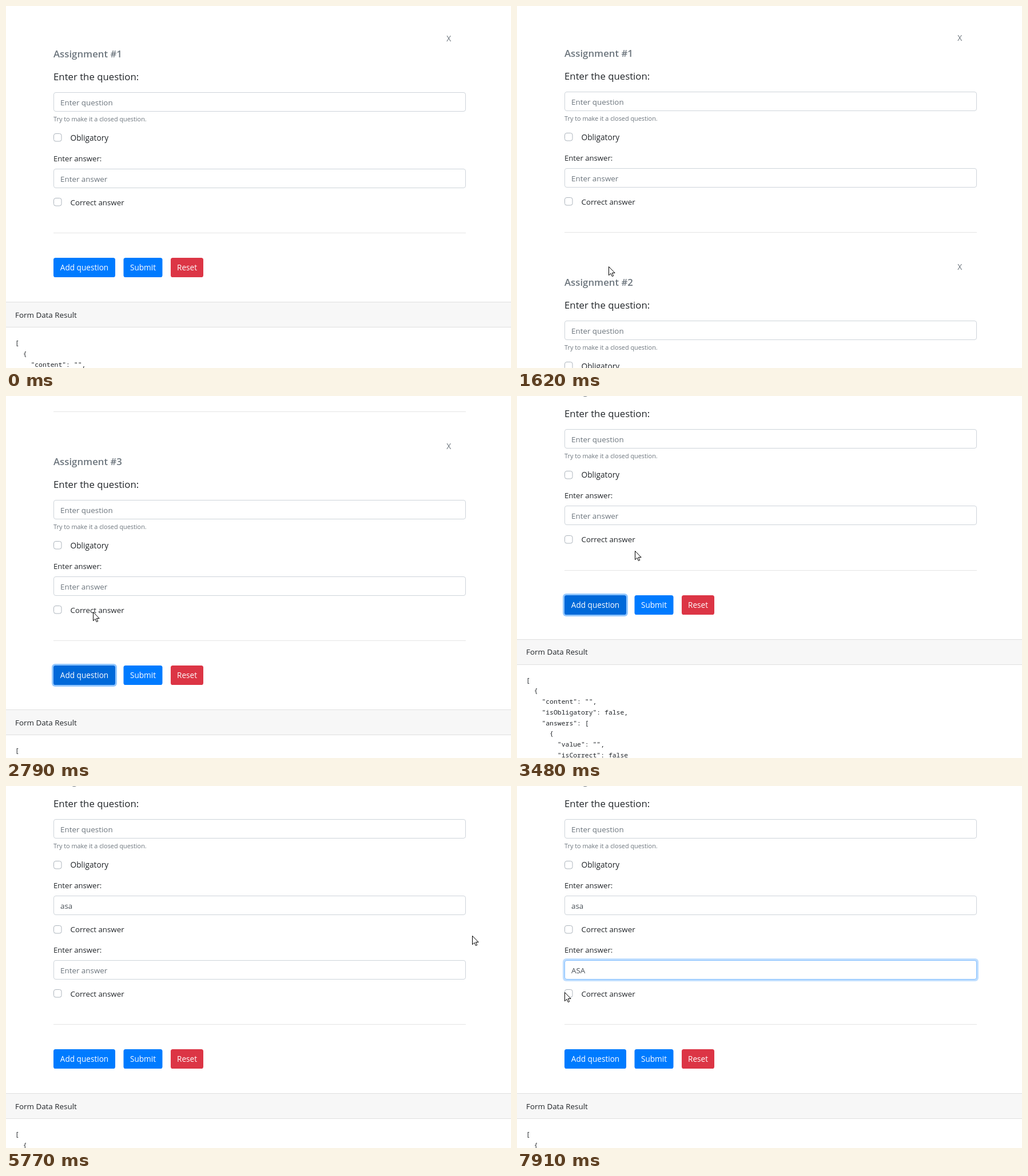
Write an HTML page that moves like this. It is 883 px wide and 634 px high and loops after 8000 ms.

```html
<!DOCTYPE html>
<html lang="en">
<head>
<meta charset="utf-8">
<title>Assignment form</title>
<style>
  html, body { margin: 0; width: 100%; height: 100%; overflow: hidden; background: #fff; }
  svg { display: block; width: 883px; height: 634px; }
  text { font-family: "Open Sans", "Noto Sans", sans-serif; white-space: pre; }
  .code { font-family: "Noto Sans Mono", "DejaVu Sans Mono", monospace; }
</style>
</head>
<body>
<svg id="stage" viewBox="0 0 883 634"></svg>
<script>
const LOOP = 8000, TICK = 10, PITCH = 400.8, ANSWER = 112.6, NOTCH = 89.42;
const INK = '#212529', GRAY = '#6c757d', BLUE = '#007bff', DARK = '#0069d9', RED = '#dc3545';
const stage = document.getElementById('stage');
const pen = document.createElement('canvas').getContext('2d');

// Times of the events, in ms
const CLICK_ADD = 1220, SECOND = 1290, THIRD = 2380, BLUR = 5350;
const ANSWERS = [
  { text: 'asa', focus: 3700, blur: BLUR, keys: [3950, 4130, 4300] },
  { text: 'ASA', focus: 6420, blur: LOOP, keys: [6860, 7040, 7200] }
];

// Pointer path: time, x, y
const PATH = [
  [0, 774, 640], [400, 774, 636], [600, 640, 455], [780, 480, 340], [980, 270, 396],
  [1160, 160, 456], [1620, 160, 456], [1920, 161, 448], [2250, 150, 328], [2450, 150, 328],
  [2790, 152, 378], [3100, 152, 366], [3260, 152, 364], [3620, 240, 212], [4120, 240, 212],
  [4580, 707, 236], [4850, 790, 252], [5000, 790, 252], [5260, 815, 262], [5790, 815, 262],
  [6080, 640, 386], [6380, 343, 328], [6860, 343, 328], [7560, 100, 352], [7640, 98, 353],
  [7880, 83, 361]
];

function pointer(t) {
  const i = PATH.findIndex(p => p[0] > t);
  if (i < 0) return PATH.at(-1).slice(1);
  const a = PATH[i - 1], b = PATH[i], k = (t - a[0]) / (b[0] - a[0]);
  return [a[1] + (b[1] - a[1]) * k, a[2] + (b[2] - a[2]) * k];
}

function smooth(t, from, to) {
  const k = Math.min(1, Math.max(0, (t - from) / (to - from)));
  return k * k * (3 - 2 * k);
}

// Six wheel notches, then four more
const scrollAt = t => NOTCH * (6 * smooth(t, 1612, 1918) + 4 * smooth(t, 2547, 2949));

const typed = (a, t) => a.text.slice(0, a.keys.filter(k => k <= t).length);

const rect = (x, y, w, h, fill, more = '') =>
  `<rect x="${x}" y="${y}" width="${w}" height="${h}" fill="${fill}" ${more}/>`;

const text = (x, y, s, size = 13.4, fill = INK, more = '') =>
  `<text x="${x}" y="${Math.round(y)}" font-size="${size}" fill="${fill}" ${more}>${s}</text>`;

const line = (x, y, w, fill) => rect(x, Math.round(y), w, 1, fill);

const inside = ([px, py], x, y, w, h) => px >= x && px < x + w && py >= y && py < y + h;

function input(y, hint, value, focused) {
  const top = Math.round(y);
  const ring = focused ? rect(80, top - 3, 727, 40, '#bfdeff', 'rx="6"') : '';
  return ring +
    rect(83.5, top + .5, 720, 33, '#fff', `rx="3.5" stroke="${focused ? '#80bdff' : '#ced4da'}"`) +
    text(95, y + 23, value || hint, 13.4, value ? '#495057' : GRAY);
}

function checkbox(y, label, size) {
  return rect(83.5, Math.round(y) + .5, 13.5, 13.5, '#fff', 'rx="3.5" stroke="#adb5bd"') +
    text(112.5, y + 12.6, label, size);
}

function button(x, y, w, label, fill, focused) {
  const top = Math.round(y);
  const ring = focused ? rect(x - 3, top - 3, w + 6, 40, '#93c7ff', 'rx="6"') : '';
  return ring + rect(x, top, w, 34, fill, 'rx="3.6"') +
    text(x + w / 2, y + 22, label, 13.6, '#fff', 'text-anchor="middle"');
}

function caret(a, y, t) {
  const last = [a.focus, ...a.keys].filter(k => k <= t).at(-1);
  if ((t - last) % 1060 >= 530) return '';
  pen.font = '13.4px "Open Sans", "Noto Sans", sans-serif';
  const x = Math.round(95 + pen.measureText(typed(a, t)).width);
  return rect(x, Math.round(y) + 8, 1, 18, INK);
}

function drawPointer([x, y], shape) {
  const art = {
    arrow: '<path d="M.5.5v15.2l3.5-3.3 2.4 5.2 2.3-1-2.4-5.1h4.8z" fill="#fff" stroke="#000"/>',
    beam: '<path d="M-3-8h2.5l.5.5.5-.5h2.5M0-7.5v15M-3 8h2.5l.5-.5.5.5h2.5" fill="none" stroke="#000"/>',
    hand: '<path d="M-1 11V1.5a1.5 1.5 0 0 1 3 0V7l7 1.5q2 .5 2 2.5l-1 5-1.5 4H1l-5-7q-1-2 1-2.5z" fill="#fff" stroke="#000"/>'
  };
  return `<g transform="translate(${Math.round(x)} ${Math.round(y)})">${art[shape]}</g>`;
}

function render(t) {
  const at = pointer(t), count = 1 + (t >= SECOND) + (t >= THIRD);
  const data = [];
  let out = '', shape = 'arrow', y = -scrollAt(t);

  const field = (top, ...rest) => {
    if (inside(at, 83, top, 721, 34)) shape = 'beam';
    return input(top, ...rest);
  };

  for (let q = 1; q <= count; q++) {
    const answers = q < 3 ? [null] : ANSWERS.slice(0, t >= BLUR ? 2 : 1);
    out += text(770.2, y + 61.8, 'X', 13.8, GRAY) +
      text(83, y + 89.9, 'Assignment #' + q, 16.8, GRAY, 'font-weight="600"') +
      text(83, y + 129.8, 'Enter the question:', 16.8) +
      field(y + 150.9, 'Enter question') +
      text(83, y + 201.9, 'Try to make it a closed question.', 10.87, GRAY) +
      checkbox(y + 223.2, 'Obligatory', 13.7);

    answers.forEach((a, i) => {
      const top = y + i * ANSWER, focused = a && t >= a.focus && t < a.blur;
      out += text(83, top + 272, 'Enter answer:', 13.15) +
        field(top + 284.6, 'Enter answer', a && typed(a, t), focused) +
        (focused ? caret(a, top + 284.6, t) : '') +
        checkbox(top + 336.2, 'Correct answer', 13.3);
    });

    data.push({
      content: '',
      isObligatory: false,
      answers: answers.map(a => ({ value: a ? typed(a, t) : '', isCorrect: false }))
    });
    y += (answers.length - 1) * ANSWER;
    out += line(83, y + 397.2, 721, '#e5e5e5');
    if (q < count) y += PITCH;
  }

  const row = y + 441.2, focused = t >= CLICK_ADD && t < ANSWERS[0].focus;
  const hover = inside(at, 83, row, 108, 34);
  if (hover) shape = 'hand';
  out += button(83, row, 108, 'Add question', hover || focused ? DARK : BLUE, focused) +
    button(205.5, row, 68, 'Submit', BLUE) +
    button(288, row, 57, 'Reset', RED);

  const head = Math.round(y + 518.2);
  out += rect(0, head, 883, 44, '#f7f7f7') +
    line(0, head, 883, '#dfdfdf') + line(0, head + 44, 883, '#dfdfdf') +
    text(16, y + 545.6, 'Form Data Result');
  JSON.stringify(data, null, 2).split('\n').forEach((s, i) => {
    out += text(16, y + 594.2 + i * 18.77, s, 11.43, INK, 'class="code"');
  });

  return out + drawPointer(at, shape);
}

let shown = '';
const start = performance.now();
function tick() {
  const t = Math.round((performance.now() - start) / TICK) * TICK % LOOP;
  const next = render(t);
  if (next !== shown) stage.innerHTML = shown = next;
  requestAnimationFrame(tick);
}
tick();
</script>
</body>
</html>
```
